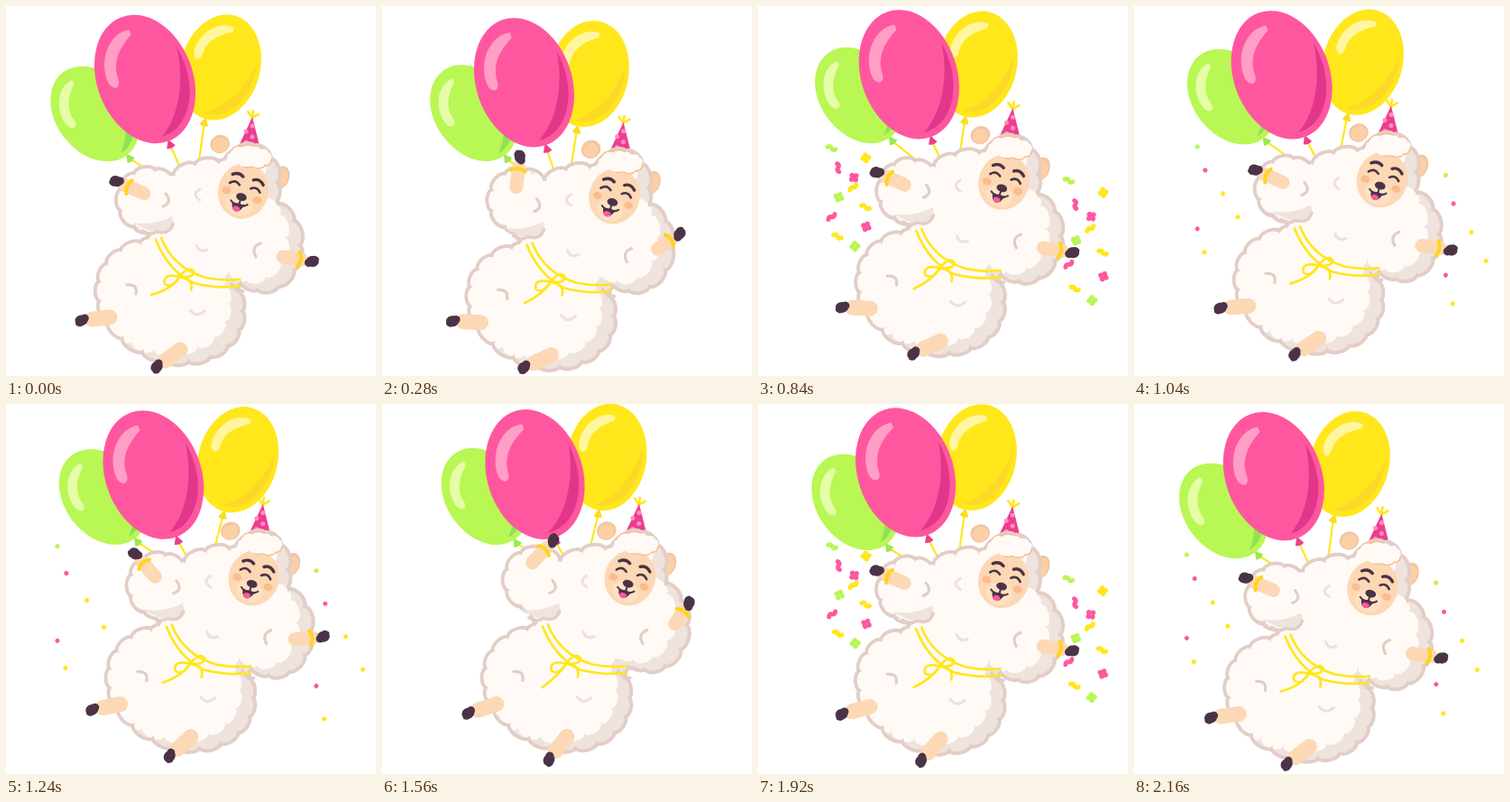
An HTML page with a canvas for the animation above (2200 ms loop, 410 by 410 pixels).

```html
<!DOCTYPE html>
<html lang="en">
<head>
<meta charset="utf-8">
<title>Party sheep</title>
<style>
html, body { margin: 0; width: 100%; height: 100%; overflow: hidden; background: #fff; }
canvas { display: block; width: 410px; height: 410px; }
</style>
</head>
<body>
<canvas id="stage" width="410" height="410"></canvas>
<script>
const ctx = document.getElementById('stage').getContext('2d');
const LOOP = 2200, HALF = 1100, STEP = 40, TAU = Math.PI * 2, DEG = Math.PI / 180;
const WOOL = '#fffaf6', SHADE = '#efe3dd', EDGE = '#e2cec7', SKIN = '#fcd8b4',
  DARK = '#4a3346', YELLOW = '#ffe71c', PINK = '#ff579f', GREEN = '#b9f754';

const clamp = v => Math.max(0, Math.min(1, v));
const mix = (a, b, k) => a + (b - a) * k;
const ease = (from, to, t) => {
  const k = clamp((t - from) / (to - from));
  return k * k * (3 - 2 * k);
};

// First and second harmonics of the loop.
function harmonics(t) {
  const p = TAU * t / LOOP;
  return { c: Math.cos(p), s: Math.sin(p), c2: Math.cos(2 * p), s2: Math.sin(2 * p) };
}

const sway = h => -4.5 * h.c - 1.5 * h.s - 5 * h.c2 - 2 * h.s2;

const yellowBalloon = {
  a: 44, b: 59.5, fill: YELLOW, shade: '#fcd927', shine: '#fff69f', knot: '#fbdc20',
  x: h => 242 - 9 * h.c - 9 * h.s + 4.5 * h.c2,
  y: h => 65 + 3 * h.c + 7 * h.s + 3 * h.s2,
  tilt: h => -12 - 4 * h.c2
};
const greenBalloon = {
  a: 43, b: 58, fill: GREEN, shade: '#8de352', shine: '#e6fda8', knot: '#9be94e',
  x: h => 108 + sway(h),
  y: h => 107.5 + 9 * h.c + 2 * h.s + 3 * h.c2 + 3.5 * h.s2,
  tilt: h => 36 + 2 * h.c2
};
const pinkBalloon = {
  a: 53, b: 73.5, fill: PINK, shade: '#e3368a', shine: '#ff9fc5', knot: '#ee3d8f',
  x: h => 163.5 + sway(h),
  y: h => 79 + 2 * h.c + 2 * h.s + 3 * h.s2,
  tilt: h => 19 + 2 * h.c2
};
const balloons = [yellowBalloon, greenBalloon, pinkBalloon];

function line(d, color, width) {
  ctx.strokeStyle = color;
  ctx.lineWidth = width;
  ctx.stroke(new Path2D(d));
}

function fill(path, color) {
  ctx.fillStyle = color;
  ctx.fill(path);
}

function outline(path, color, width) {
  ctx.strokeStyle = color;
  ctx.lineWidth = width;
  ctx.stroke(path);
}

function oval(x, y, rx, ry, color, rot = 0) {
  ctx.fillStyle = color;
  ctx.beginPath();
  ctx.ellipse(x, y, rx, ry, rot, 0, TAU);
  ctx.fill();
}

function at(x, y, rot, draw) {
  ctx.save();
  ctx.translate(x, y);
  ctx.rotate(rot);
  draw();
  ctx.restore();
}

// Ellipse whose rim is made of round tufts.
function cloud(cx, cy, rx, ry, tufts, rot = 0) {
  const p = new Path2D();
  const rim = i => {
    const q = TAU * i / tufts, u = rx * Math.cos(q), v = ry * Math.sin(q);
    return [cx + u * Math.cos(rot) - v * Math.sin(rot), cy + u * Math.sin(rot) + v * Math.cos(rot)];
  };
  p.moveTo(...rim(0));
  for (let i = 0; i < tufts; i++) {
    const [x, y] = rim(i), [X, Y] = rim(i + 1);
    const nx = (Y - y) * 0.38, ny = (x - X) * 0.38;
    p.bezierCurveTo(x + nx, y + ny, X + nx, Y + ny, X, Y);
  }
  p.closePath();
  return p;
}

function string(o, h, hx, hy) {
  const r = o.tilt(h) * DEG, d = o.b + 5;
  line(`M${o.x(h) + Math.sin(r) * d} ${o.y(h) + Math.cos(r) * d} L${hx} ${hy}`, YELLOW, 2.2);
}

function balloon(o, h) {
  const { a, b } = o;
  const bend = (...c) => ctx.bezierCurveTo(...c.map((v, i) => v * (i % 2 ? b : a)));
  at(o.x(h), o.y(h), -o.tilt(h) * DEG, () => {
    fill(new Path2D(`M0 ${b - 2} L5 ${b + 7} Q0 ${b + 10} -5 ${b + 7} Z`), o.knot);
    oval(0, 0, a, b, o.fill);
    ctx.fillStyle = o.shade;
    ctx.beginPath();
    ctx.moveTo(a * 0.86, -b * 0.28);
    bend(1.02, 0.35, 0.55, 0.95, -0.1, 0.9);
    bend(0.35, 0.72, 0.74, 0.3, 0.86, -0.28);
    ctx.fill();
    ctx.fillStyle = o.shine;
    ctx.beginPath();
    ctx.moveTo(a * 0.06, -b * 0.78);
    bend(-0.35, -0.85, -0.8, -0.5, -0.74, -0.12);
    bend(-0.66, 0.02, -0.52, -0.02, -0.52, -0.16);
    bend(-0.5, -0.45, -0.2, -0.6, 0.06, -0.7);
    ctx.fill();
  });
}

// Skin capsule ending in a hoof; bracelet is optional.
function limb(ax, ay, hx, hy, width, ring) {
  const len = Math.hypot(hx - ax, hy - ay), w = len * 0.53;
  at(ax, ay, Math.atan2(hy - ay, hx - ax), () => {
    line(`M0 0 L${Math.max(2, len - 12)} 0`, SKIN, width);
    oval(len, 0, 7, 6, DARK);
    oval(len - 4, 2, 4.5, 4.5, DARK);
    oval(len + 3, -3.5, 4, 2.8, DARK, 0.4);
    if (ring) line(`M${w} -8 Q${w + 5} 0 ${w} 8`, '#ffd51c', 4);
  });
}

function hat() {
  line('M272 125 L267 118 M272 125 L273 117 M272 125 L279 121', YELLOW, 2.6);
  fill(new Path2D('M272 124 L256 158 L281 160 Z'), '#ee3d8f');
  for (let i = 0; i < 4; i++) oval(272 - (i % 2) * 7, 134 + i * 6, 2.5, 2.5, '#ff8fc0');
}

function ear(x, y, rx, ry, rot) {
  oval(x, y, rx, ry, '#efc6a5', rot);
  oval(x, y + 1, rx - 2, ry - 2, '#fccfa4', rot);
}

function face() {
  at(262, 206, 0.31, () => {
    oval(0, 0, 28, 31, SKIN);
    oval(-18, 5, 5, 4, '#fdbb8e');
    oval(18, 5, 5, 4, '#fdbb8e');
    oval(0, 16, 15, 12, '#ffe1c2');
    line('M-17 -14 Q-11 -19 -5 -15 M7 -15 Q13 -19 19 -13', DARK, 3.4);
    line('M-17 -4 Q-12 -10 -6 -5 M7 -5 Q13 -10 18 -4', DARK, 2.6);
    oval(0, 7, 6, 4.2, DARK);
    fill(new Path2D('M-8 15 Q-1 18 6 14 Q4 24 -2 24 Q-7 23 -8 15 Z'), DARK);
    oval(-1.5, 21, 4, 3, PINK);
    line('M0 10 L0 15 M-10 14 Q-5 18 0 15 Q5 18 9 13', DARK, 2);
  });
  const fringe = cloud(270, 168, 22, 8, 9, 0.2);
  outline(fringe, '#f7bd92', 3);
  fill(fringe, WOOL);
  fill(cloud(269, 168, 24, 8, 12), WOOL);
}

function fleece(liftL, liftR) {
  const p = new Path2D();
  [
    cloud(181, 328, 79, 60, 19, 0.4),
    cloud(228, 243, 68, 66, 17),
    cloud(158, 216 - liftL, 31, 31, 9),
    cloud(284, 266 - liftR, 37, 47, 11),
    cloud(269, 197, 27, 39, 9)
  ].forEach(part => p.addPath(part));
  outline(p, EDGE, 8);
  fill(p, SHADE);
  ctx.save();
  ctx.clip(p);
  ctx.translate(-13, -8);
  fill(p, WOOL);
  ctx.restore();
  fill(new Path2D('M139 241 Q162 245 183 234 L185 243 Q175 254 157 250 Z'), SHADE);
  line('M150 250 Q158 256 166 251 Q180 255 184 243', EDGE, 3.5);
  line('M262 317 Q252 317 249 309', EDGE, 3.5);
}

function curls() {
  line('M176 209 Q184 219 173 223 M281 264 Q270 268 276 279 M133 310 Q145 309 143 320', EDGE, 3.2);
  line('M214 204 Q204 210 214 216 M210 266 Q213 275 222 271 M203 338 Q210 347 219 339', '#eee0da', 3);
}

function belt(tx, ty) {
  line('M171 258 Q184 291 220 302 Q240 306 258 304 M165 260 Q179 295 207 308 Q235 315 258 311', YELLOW, 2.7);
  line('M191 301 Q172 297 175 309 Q183 315 191 301 Q202 288 207 295 Q207 303 191 301', YELLOW, 2.7);
  line(`M191 302 Q182 315 ${tx} ${ty} M194 302 Q207 304 204 316`, YELLOW, 2.7);
}

function arms(t) {
  const p = t % HALF;
  const raise = ease(0, 460, p) * (1 - ease(450, 620, p));
  const arm = (x, y, angle, len) =>
    [x, y, x + len * Math.cos(angle * DEG), y + len * Math.sin(angle * DEG)];
  return {
    raise,
    left: arm(mix(152, 154, raise), mix(209, 189, raise), mix(204, 314, raise), 34),
    right: arm(mix(306, 312, raise), mix(279, 257, raise), mix(9, -57, raise), mix(33, 28, raise))
  };
}

function piece(kind, color, size, fade) {
  if (kind === 'streak') {
    const l = 4.5 * size + 0.05, w = 2.5 * size;
    line(`M${-l} 0 Q${-l / 2} ${-w} 0 0 T${l} 0`, color, 5 * fade);
  } else if (size > 0) {
    for (let i = 0; i < 4; i++) {
      const q = i * TAU / 4 + 0.6, d = 3.2 * size;
      oval(Math.cos(q) * d, Math.sin(q) * d, 2.8 * size, 2.8 * size, color);
    }
  }
}

// Pieces zigzag down a column beside the hand, then drift outward and shrink to dots.
function burst(age, x, y, mid, top) {
  if (age < 0 || age > 800) return;
  const drift = Math.max(0, age - 285) / 220;
  const spread = 1 - Math.exp(-age / 65) + 0.2 * drift;
  const size = 1 - ease(355, 490, age), fade = 1 - ease(690, 800, age);
  const colors = [GREEN, YELLOW, PINK, PINK, YELLOW];
  for (let i = 0; i < 11; i++) {
    const dx = mid - 20 * Math.cos(2.7 * i), dy = mix(top, 87, i / 10);
    const kind = i % 7 % 2 ? 'flower' : 'streak';
    at(x + dx * spread, y + dy * spread + 6 * drift, i * 2.1 + 0.3,
      () => piece(kind, colors[i % 5], size, fade));
  }
}

function draw(t) {
  const h = harmonics(t);
  const lift = 7 - 6 * (h.c + h.s) - 3 * h.s2;
  const kick = 7 * h.s;
  const { raise, left, right } = arms(t);
  const age = (t < 1600 ? t : t - HALF) - 545;
  const inBody = fn => at(lift, -1.05 * lift, 0, fn);

  ctx.fillStyle = '#fff';
  ctx.fillRect(0, 0, 410, 410);
  ctx.lineCap = ctx.lineJoin = 'round';

  inBody(hat);
  balloons.forEach(o => string(o, h, 207 + lift, 215 - lift));
  balloons.forEach(o => balloon(o, h));
  inBody(() => {
    ear(236, 154, 11, 10, -0.4);
    ear(304, 191, 9, 13, 0.3);
    fleece(raise * 8, raise * 8);
    curls();
    belt(162.5 - 2.5 * h.c2, 324.5 - 3.5 * h.c2);
    face();
    limb(114, 346, 82.5, 349.5 - kick, 17);
    limb(192, 382, 166 - 0.9 * kick, 401 - kick, 17);
    limb(...left, 15, true);
    limb(...right, 15, true);
    burst(age, 143, 190, -52, -22);
    burst(age, 342, 250, 12, -46);
  });
}

const start = performance.now();
function tick() {
  const t = (performance.now() - start) % LOOP;
  draw(Math.floor(t / STEP) * STEP);
  requestAnimationFrame(tick);
}
tick();
</script>
</body>
</html>
```
